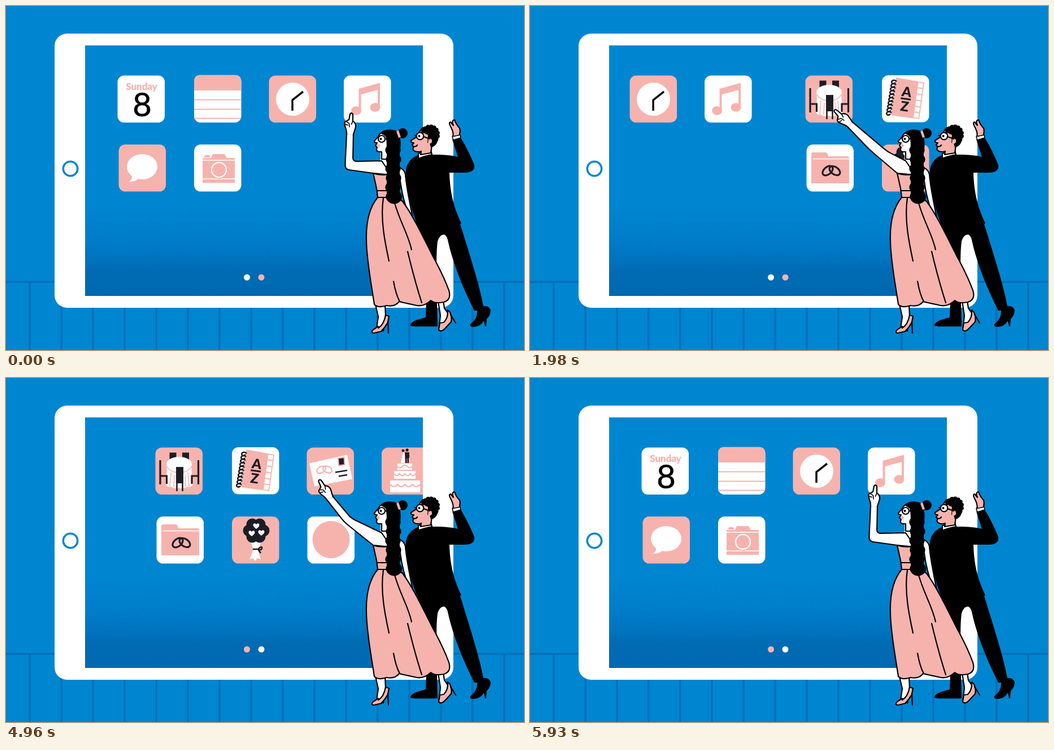
Animation, 917 px wide and 611 px high, one loop 6350 ms. Source, as an HTML page:

```html
<!DOCTYPE html>
<html lang="en">
<head>
<meta charset="utf-8">
<title>Wedding tablet</title>
<style>
  html, body { margin: 0; width: 100%; height: 100%; overflow: hidden; background: #0086d1; }
  svg { display: block; width: 100%; height: 100%; }
  .w { fill: #fff; }
  .p { fill: #f6b3ae; }
  .k { fill: #000; }
  .ink { stroke: #000; stroke-width: 2.2; stroke-linejoin: round; stroke-linecap: round; }
  .line { fill: none; }
  .pl { fill: none; stroke: #f6b3ae; stroke-width: 2.2; }
  .wl { fill: none; stroke: #fff; stroke-width: 2.2; }
  .d { fill: #1d1d25; }
  .dl { fill: none; stroke: #1d1d25; stroke-width: 2.6; }
  .thin { stroke-width: 1.6; }
  .bold { stroke-width: 3.2; }
  text { text-anchor: middle; font-family: Lato, "Open Sans", sans-serif; }
</style>
</head>
<body>
<svg viewBox="0 0 917 611">
  <defs>
    <linearGradient id="shade" x1="0" y1="70" x2="0" y2="515" gradientUnits="userSpaceOnUse">
      <stop offset="0" stop-color="#0086d1"/>
      <stop offset=".64" stop-color="#0085d0"/>
      <stop offset=".76" stop-color="#007eca"/>
      <stop offset=".85" stop-color="#0074bf"/>
      <stop offset=".9" stop-color="#006bb4"/>
      <stop offset="1" stop-color="#0068b0"/>
    </linearGradient>
    <clipPath id="screen"><rect x="140" y="70" width="598" height="445"/></clipPath>
    <rect id="tile" width="83.500" height="83.500" rx="11.500"/>
    <path id="heart" d="M0 5C-10 -1 -4 -8 0 -3C4 -8 10 -1 0 5Z"/>
  </defs>

  <rect width="917" height="611" fill="#0086d1"/>
  <path id="floor" fill="none" stroke="#006fba" stroke-width="3.600"/>

  <!-- tablet -->
  <rect class="w" x="86" y="49" width="706" height="487" rx="22"/>
  <circle cx="114" cy="289" r="12.700" fill="none" stroke="#0086d1" stroke-width="3.600"/>
  <rect x="140" y="70" width="598" height="445" fill="url(#shade)"/>
  <path id="grain" fill="none" stroke="#0067af" stroke-width="1.200" opacity=".3"/>
  <circle id="dot1" cx="426.500" cy="482" r="5.500"/>
  <circle id="dot2" cx="452" cy="482" r="5.500"/>

  <g clip-path="url(#screen)">
    <g id="home">
      <use href="#tile" class="w" x="197.500" y="123.500"/>
      <text class="p" x="240" y="149" font-size="17" font-weight="700" stroke="#f6b3ae" stroke-width=".5">Sunday</text>
      <text class="k" x="241" y="196" font-size="58" stroke="#000" stroke-width=".6">8</text>

      <use href="#tile" class="w" x="333" y="123.500"/>
      <path class="p" d="M333 150V134Q333 122.500 344 122.500H405Q416.500 122.500 416.500 134V150Z"/>
      <path class="pl" d="M333 166.500h83M333 183.500h83M333 199.500h83"/>

      <use href="#tile" class="p" x="465.500" y="123.500"/>
      <circle class="w" cx="507.500" cy="165.500" r="29.500"/>
      <path d="M507 186V167L526 152" fill="none" stroke="#111" stroke-width="3.600"/>

      <use href="#tile" class="w" x="598" y="123.500"/>
      <path class="p" d="M624.500 147L662 136.500V180H658V149L628.500 157V186H624.500Z"/>
      <ellipse class="p" cx="620" cy="186" rx="9" ry="7.800"/>
      <ellipse class="p" cx="653.500" cy="180" rx="9" ry="7.800"/>

      <use href="#tile" class="p" x="199.500" y="246"/>
      <ellipse class="w" cx="241" cy="285.500" rx="27" ry="22.500"/>
      <path class="w" d="M223 298Q225 307 218 312Q230 313 236 304Z"/>

      <use href="#tile" class="w" x="333" y="246"/>
      <path class="p" d="M348 270H363L366 263H387L391 270H405V314H348ZM351 269V266Q356 263 361 266V269Z"/>
      <path class="wl thin" d="M348 274H405M348 307H405"/>
      <circle class="p" cx="377" cy="291" r="16"/>
      <circle class="wl" cx="377" cy="291" r="13"/>
    </g>

    <g id="plans">
      <!-- table -->
      <use href="#tile" class="p" x="197.500" y="123.500"/>
      <path class="d" d="M222.500 132.500h12v18h-12zM245 132.500h12v18h-12z"/>
      <path class="w" d="M217 153C219 165 217 180 216 189Q220 195 225 193Q232 198 239 195Q247 198 254 193Q260 195 264 189C263 178 260 165 262 153Z"/>
      <path class="pl thin" d="M225 168L223 193M255 168L257 193M231 172L230 193M250 172L251 193"/>
      <ellipse class="w" cx="239.500" cy="153" rx="22.500" ry="13"/>
      <path class="pl thin" d="M217 156Q223 168 239.500 168Q256 168 262 156"/>
      <path class="dl bold" d="M206 146V189M206 174H217.500V188M273.500 146V189M273.500 174H262V188"/>
      <path class="d" d="M234 158h13v29h-13z"/>
      <path class="dl" d="M235.500 186V201M245.500 186V201"/>

      <!-- address book -->
      <use href="#tile" class="w" x="333" y="123"/>
      <path class="p" d="M358 127L408 136L399 201L349 194Z"/>
      <path class="w" d="M397.500 136L406 137.500L397.500 199L389 198Z"/>
      <path class="pl" d="M395 145l10 1.500M393.500 156l10 1.500M392 167l10 1.500M390.500 178l10 1.500M389 188l10 1.500"/>
      <path id="spiral" class="dl"/>
      <g transform="rotate(8 375 166)" class="d" font-size="24" font-weight="900">
        <text x="375" y="161">A</text>
        <rect x="366" y="163.500" width="18" height="3"/>
        <text x="375" y="187">Z</text>
      </g>

      <!-- invitation -->
      <use href="#tile" class="p" x="465.500" y="123.500"/>
      <path class="w" d="M470 151.500L537 136.500L546 179.500L479 192.500Z"/>
      <g class="pl"><ellipse cx="491" cy="163" rx="8.500" ry="5.500" transform="rotate(-30 491 163)"/><ellipse cx="502" cy="162.500" rx="8.500" ry="5.500" transform="rotate(25 502 162.500)"/></g>
      <path d="M521 142.500l10.500-1.500 1 13-10.500 1.500z" fill="#1d1d25" stroke="#f6b3ae" stroke-width="2"/>
      <path class="dl" d="M516 167.500L537 164M522 174.500L537 172"/>

      <!-- cake -->
      <use href="#tile" class="p" x="598" y="123.500"/>
      <path class="w" d="M626 152H652V163H626ZM620 165H658V179H620ZM613 182H666V203H613Z"/>
      <path class="pl" d="M626 157q4.300 5 8.600 0t8.700 0 8.700 0M620 170q4.800 7 9.500 0 4.800 7 9.500 0 4.800 7 9.500 0 4.800 7 9.500 0M613 189q6.600 8 13.200 0 6.600 8 13.200 0 6.600 8 13.200 0 6.600 8 13.400 0"/>
      <path class="w" d="M636 131L632 151H639L639 134Z"/>
      <circle class="d" cx="636" cy="129" r="2.500"/><circle class="d" cx="643" cy="128" r="2.700"/>
      <path class="d" d="M639 132H647V142H646V151H643.500V143H642.500V151H640Z"/>

      <!-- folder -->
      <use href="#tile" class="w" x="199.500" y="246"/>
      <path class="p" d="M208 315V263Q208 260 211 260H233Q237 260 238 267H272Q275 267 275 270V315Z"/>
      <path class="wl thin" d="M211 271.500H275"/>
      <g class="dl bold"><ellipse cx="237" cy="292.500" rx="10.500" ry="6.500" transform="rotate(-40 237 292.500)"/><ellipse cx="249.500" cy="292.500" rx="10.500" ry="6.500" transform="rotate(35 249.500 292.500)"/></g>

      <!-- bouquet -->
      <use href="#tile" class="p" x="333" y="246"/>
      <path class="w" d="M366 290H385L379 305L384 322L378 320L374 325L370 320L364 322L371 305Z"/>
      <g class="d"><circle cx="363" cy="271" r="10.500"/><circle cx="369" cy="260" r="10.500"/><circle cx="382" cy="260" r="10.500"/><circle cx="389" cy="271" r="10.500"/><circle cx="382" cy="282" r="10.500"/><circle cx="369" cy="282" r="10.500"/><circle cx="376" cy="271" r="15"/></g>
      <g class="w"><use href="#heart" x="376" y="263"/><use href="#heart" x="368" y="276"/><use href="#heart" x="385" y="275"/></g>
      <path class="dl" d="M370 304H379Q387 297 386 303Q384 307 379 304L384 311"/>

      <use href="#tile" class="w" x="466.500" y="246"/>
      <circle class="p" cx="508.500" cy="287" r="33"/>
    </g>
  </g>

  <!-- man -->
  <path class="k" d="M729 265C714 271 706 284 708 302C712 345 722 375 733 400C741 450 746 500 743 553L733 556Q716 560 716 568Q718 570 764 569L763 530C764 490 760 450 764 418Q768 405 776 406Q781 408 783 420C791 455 808 500 829 541L834 541Q835 556 822 565Q821 570 826 570Q839 571 846 559L848 569H850L851 556Q858 549 858 540Q854 531 845 533C837 490 820 440 804 387L806 386C794 360 786 335 785 296H812Q831 296 829 282Q818 255 805 234L790 237L800 268C785 264 765 264 752 264Z"/>
  <path class="p ink" d="M791 232C793 226 790 220 787 214Q783 207 787 206L792 212Q788 203 794 202Q797 211 803 217Q805 223 802 231Z"/>
  <path class="w ink thin" d="M790 232L804 229L805 234L792 238Z"/>
  <path class="w ink" d="M730 262L752 256L754 264Q742 266 730 271Z"/>
  <path class="p ink" d="M738 216C732 222 729 229 726 233L717 239Q716 243 722 243L719 247L722 250Q718 255 724 258Q729 260 735 258L734 264L752 261L755 240L752 216Z"/>
  <path class="ink line" d="M720 249Q726 251 728 247"/>
  <path class="k" d="M735 219Q742 212 755 214Q766 222 765 237Q762 250 752 251L750 244L746 243L747 229Q738 226 735 219Z"/>
  <g id="curls" class="k"></g>
  <path class="p" d="M748 236Q755 234 754 242Q750 247 747 243Z"/>
  <circle class="w ink" cx="733" cy="231" r="6.300"/>
  <path class="ink line" d="M739 232L750 236M727 231L724 230"/>
  <circle class="k" cx="731.500" cy="231" r="2"/>

  <!-- woman -->
  <path class="w ink" d="M765 524L769 550L766 575Q770 579 776 572L783 563Q787 549 776 537L774 522Z"/>
  <path class="p ink" d="M768 563L766 575Q770 580 777 573L788 561Q790 554 786 544L782 540Q783 554 775 562Z"/>
  <path class="ink line" d="M787 548L796 563"/>
  <path class="w ink" d="M654 530L659 552L656 572L668 577L672 551L671 530Z"/>
  <path class="p ink" d="M659 569L650 575Q645 580 651 581L664 578Q671 571 676 562L678 551L672 549Q669 566 659 572Z"/>
  <path class="ink line" d="M676 560L677 581"/>
  <path class="w ink" d="M694 286Q705 289 707 299C709 325 716 355 722 386L713 371Q703 345 699 318Z"/>
  <path class="w" d="M663 252V272L654 284L651 300H690V252Z"/>
  <path id="arm" class="w ink"/>
  <g id="hand" class="w ink">
    <path d="M-6 1C-6 -6 -10 -11 -11 -16Q-12 -21 -8 -22L-4 -25L-3 -35Q-1 -39 2 -35L3 -23Q9 -20 9 -13L6 1"/>
    <path class="line thin" d="M-10 -16L-5 -15M-8 -21L-3 -18L-2 -12M3 -23L1 -17"/>
  </g>
  <path class="p ink" d="M650 297Q664 302 690 298V340H658L656 324Z"/>
  <path class="p ink" d="M658 340H692L702 347C718 368 736 405 756 445Q775 480 784 505Q789 522 775 526Q759 529 752 523Q738 536 723 531Q704 527 696 525Q688 535 674 532Q658 537 652 530C647 495 638 450 638 416C637 382 644 357 658 340Z"/>
  <path class="ink line" d="M657 328H680M668 341C662 380 672 425 678 453M688 350C698 385 712 405 718 433M686 489Q690 512 697 525M711 436Q724 490 736 527"/>
  <path class="w ink" d="M668 224Q661 226 659 232L652 240Q652 243 657 243L654 248L657 251Q654 258 660 259L665 259V272L686 272V226Z"/>
  <circle class="p" cx="659" cy="248" r="2.800"/>
  <path class="k" d="M662 226Q671 217 686 220Q697 222 698 237Q700 250 696 262H673Q675 242 672 232Q668 228 662 226Z"/>
  <path class="k" d="M674 250H697V340H674Z"/>
  <g id="braid" class="k"></g>
  <circle class="k" cx="702" cy="226" r="9"/>
  <path class="p" d="M691 223L695 221L699 233L695 234Z"/>
  <circle class="w ink" cx="665" cy="236" r="6"/>
  <path class="ink line" d="M671 236L677 237M659 235L657 234"/>
  <circle class="k" cx="663.500" cy="236" r="2"/>
</svg>
<script>
const $ = id => document.getElementById(id);
const LOOP = 6350, STEP = 80, PINK = '#f6b3ae', WHITE = '#fff';

// static repeats
let seed = 7;
const rand = () => (seed = seed * 16807 % 2147483647) / 2147483647;
let floor = 'M0 490H917';
for (let x = 42; x < 917; x += 56) floor += `M${x} 490V611`;
$('floor').setAttribute('d', floor);

let grain = '';
for (let i = 0; i < 1100; i++) {
  const x = 141 + rand() * 594, y = 460 - Math.abs(rand() + rand() - 1) * 95;
  grain += `M${x.toFixed(1)} ${y.toFixed(1)}h1.6`;
}
$('grain').setAttribute('d', grain);

let spiral = '';
for (let i = 0; i < 10; i++) spiral += `M${359 - i} ${134 + i * 6.2}c-5 -5 -11 0 -8 3q3 2 6 -1`;
$('spiral').setAttribute('d', spiral);

const blob = (x, y, rx, ry) => `<ellipse cx="${x}" cy="${y}" rx="${rx}" ry="${ry}"/>`;
let curls = '';
for (let i = 0; i < 9; i++) {
  const a = (-155 + i * 24) * Math.PI / 180;
  curls += blob(751 + 13.5 * Math.cos(a), 228 + 14 * Math.sin(a), 3.7, 3.7);
}
$('curls').innerHTML = curls;
let braid = '';
for (let i = 0; i < 6; i++) braid += blob(685 + i % 2, 256 + i * 16.5, 13.6, 10.5);
$('braid').innerHTML = braid + blob(687, 339, 14, 12.5);

// arm poses: wrist x, y, angle, outer elbow x, y, inner elbow x, y
const tap = [609, 227, 5, 600, 290, 614, 276];
const lift = [600, 219, -9, 597, 279, 611, 267];
const drag = [573, 213, -29, 599, 256, 611, 249];
const reach = [566, 210, -46, 602, 256, 632, 258];
const mix = (a, b, u) => a.map((v, i) => v + (b[i] - v) * u);
const moves = [
  [0, tap], [420, lift], [1420, mix(lift, drag, .5)], [1500, drag], [1580, reach],
  [4960, drag], [5040, mix(drag, lift, .5)], [5120, lift], [5930, tap]
];

function bend(from, elbow, to) {
  const a = mix(elbow, from, .14), b = mix(elbow, to, .14);
  return `L${a}Q${elbow} ${b}L${to}`;
}

function drawArm([x, y, deg, ox, oy, ix, iy]) {
  const r = deg * Math.PI / 180, dx = 6 * Math.cos(r), dy = 6 * Math.sin(r);
  const pit = [650, 297], top = [665, 275];
  const left = [x - dx, y - dy], right = [x + dx, y + dy];
  $('arm').setAttribute('d',
    `M${pit}${bend(pit, [ox, oy], left)}L${right}${bend(right, [ix, iy], top)}L682 300Z`);
  $('hand').setAttribute('transform', `translate(${x} ${y}) rotate(${deg})`);
}

const count = (t, start, max) =>
  Math.max(0, Math.min(max, Math.floor((t - start) / STEP)));

function draw(t) {
  const go = count(t, 1340, 13), back = count(t, 4880, 11);
  let home = go < 5 ? -5.16 * go * go : -129 - 53.3 * (go - 5);
  let plans = 58 * (13 - go);
  if (back) {
    home = -55.7 * (11 - back);
    plans = 68 * back - 1;
  }
  $('home').setAttribute('transform', `translate(${home} 0)`);
  $('plans').setAttribute('transform', `translate(${plans} 0)`);
  $('dot1').setAttribute('fill', t < 2380 ? WHITE : PINK);
  $('dot2').setAttribute('fill', t < 2380 ? PINK : WHITE);
  drawArm(moves.filter(m => m[0] <= t).pop()[1]);
}

const start = performance.now();
function tick() {
  draw((performance.now() - start) % LOOP);
  requestAnimationFrame(tick);
}
tick();
</script>
</body>
</html>
```
